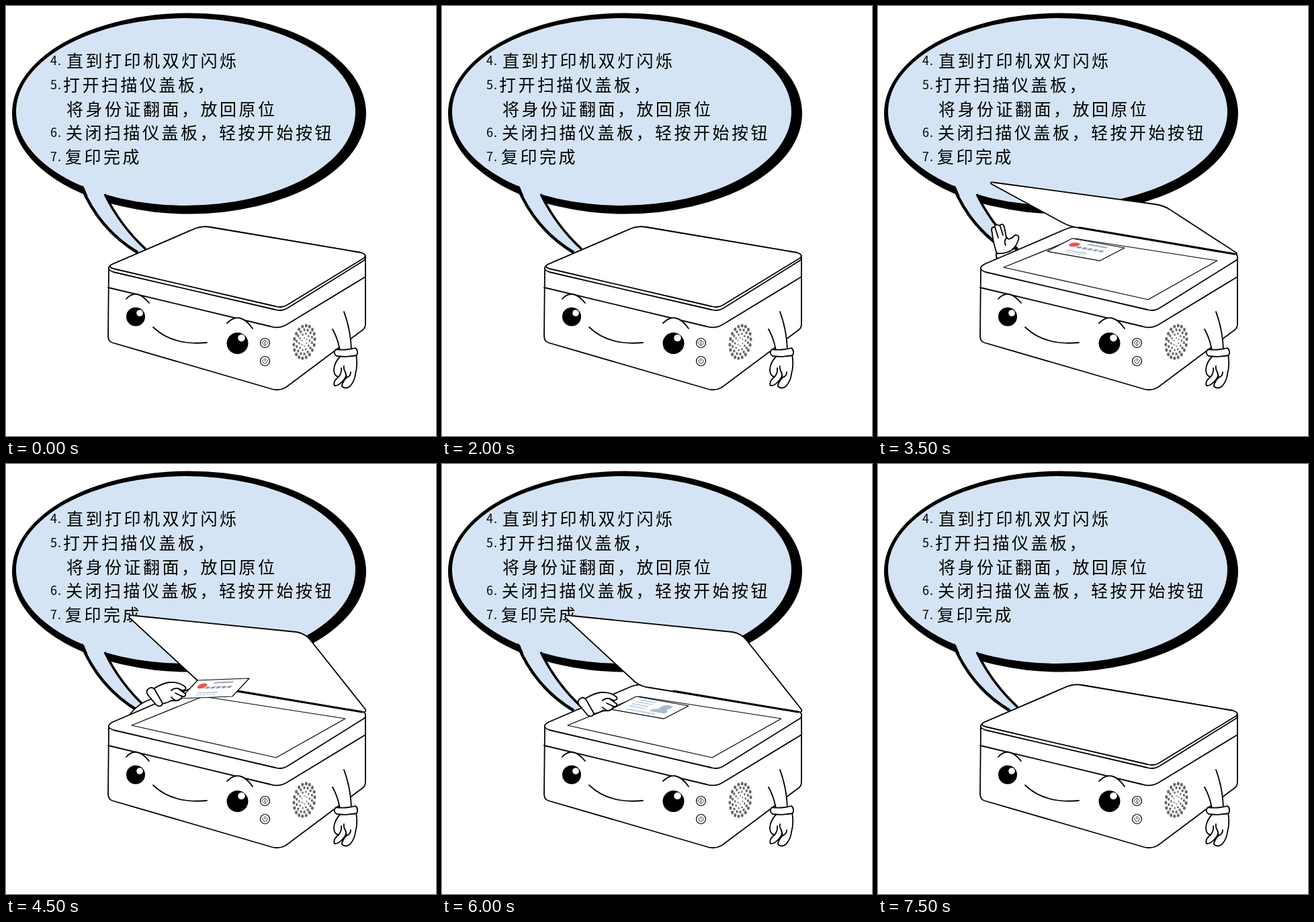
An HTML page for the animation above (8 s loop, 640 px wide and 640 px high).

```html
<!DOCTYPE html>
<html lang="zh-CN">
<head>
<meta charset="utf-8">
<title>复印步骤</title>
<style>
html, body { margin: 0; height: 100%; overflow: hidden; background: #fff; }
svg { display: block; width: 100vw; height: 100vh; }
text { font: 300 25px "Noto Sans CJK SC", "Noto Sans CJK", sans-serif; letter-spacing: 3.5px; }
.num { font-size: 18px; letter-spacing: 1px; }
.ink { fill: #fff; stroke: #000; stroke-width: 1.8; stroke-linejoin: round; stroke-linecap: round; }
.line { fill: none; }
.thin { stroke-width: 1.2; }
</style>
</head>
<body>
<svg viewBox="0 0 640 640">
  <ellipse cx="272.5" cy="160" rx="263.5" ry="149.5"/>
  <ellipse cx="267.5" cy="157.5" rx="252.5" ry="139.5" fill="#d5e4f5"/>
  <path d="M113 262Q138 331 197 367L208 363Q168 325 145 274Z" fill="#d5e4f5"/>
  <path d="M112 268Q138 332 196 367" fill="none" stroke="#000" stroke-width="4.5"/>
  <path d="M147 280Q170 327 208 362" fill="none" stroke="#000" stroke-width="3.5"/>
  <g id="words"></g>

  <g id="push" class="ink">
    <path d="M177 380L176 366Q171 350 170 338Q167 329 173 329Q176 323 181 327Q186 322 188 329L191 345Q195 350 204 341Q211 340 209 348Q205 359 200 362L207 374Z"/>
    <path class="line" d="M174 329L179 345M182 328L186 341M191 345Q187 351 190 356"/>
    <path d="M177 368Q190 370 203 361Q208 364 204 368Q190 378 178 376Q174 371 177 368Z"/>
  </g>
  <path id="arm" class="ink" d="M180 379Q194 357 216 350L231 359Q212 364 198 376"/>

  <g id="printer" class="ink">
    <path d="M153 391L152 491Q152 499 158 501L392 569Q405 574 416 568L531 482Q535 479 535 473L535 375L293 331Z"/>
    <path d="M159 384L282 331Q292 327 303 329L528 367Q538 370 534 378L420 449Q411 455 401 452L160 396Q146 391 159 384Z"/>
    <path class="line" d="M152 419L394 477Q406 481 418 474L535 403"/>
    <path id="glass" class="thin" d="M187 389L293 346L505 379L402 437Z"/>
    <path d="M179 436Q194 419 213 442"/>
    <path d="M329 472Q348 453 367 480"/>
    <path class="line" d="M219 478Q248 506 299 501"/>
    <g stroke="none">
      <circle cx="193" cy="462.500" r="14" fill="#000"/><circle cx="199" cy="457" r="4.800"/>
      <circle cx="344.500" cy="502" r="16" fill="#000"/><circle cx="350.500" cy="494" r="5.300"/>
    </g>
    <g class="thin">
      <circle class="lamp" cx="385.500" cy="501.500" r="7"/>
      <circle class="lamp" cx="385.500" cy="528.500" r="7"/>
      <path class="line" stroke-width=".8" d="M385.500 497l4.500 4.500l-4.500 4.500l-4.500 -4.500zM385.500 499v5M383 526a3.500 3.500 0 1 0 5 0M385.500 524.500v4"/>
    </g>
    <g id="speaker" fill="#666" stroke="none"></g>
    <path stroke="none" d="M503 455Q513 482 514 512L497 513Q494 495 486 481Z"/>
    <path class="line" d="M503 455Q513 482 514 512M486 481Q494 495 497 513"/>
    <path d="M499 520Q489 529 488 541Q488 551 495 552Q486 559 489 565Q495 566 503 556Q508 551 505 545L507 553Q500 560 500 566Q505 571 512 566Q519 558 520 548Q524 534 521 519Z"/>
    <path class="line" d="M495 552Q500 546 499 539M505 545Q502 540 503 536M507 553Q513 551 513 545"/>
    <path d="M491 511Q505 513 520 509Q525 513 522 520Q506 523 492 521Q486 517 491 511Z"/>
  </g>

  <g id="bedCard"></g>
  <g class="ink">
    <path id="lid"/>
    <path id="hinge" class="line" stroke-width="3"/>
  </g>
  <g id="heldCard"></g>
  <g id="hand" class="ink">
    <path d="M219 335Q233 326 243 325Q258 324 267 332Q269 336 263 337L256 334L267 342Q268 347 262 346Q260 354 246 352Q240 356 231 357Z"/>
    <path class="line" d="M263 346L252 341M256 334Q250 333 246 337M253 352Q248 350 246 347"/>
    <path d="M213 334Q206 338 213 346L224 359Q231 363 233 356L221 335Q217 331 213 334Z"/>
  </g>
</svg>
<script>
const $ = id => document.getElementById(id);

const lines = [
  ['4.', 90, '直到打印机双灯闪烁'],
  ['5.', 85, '打开扫描仪盖板，'],
  ['', 90, '将身份证翻面，放回原位'],
  ['6.', 89, '关闭扫描仪盖板，轻按开始按钮'],
  ['7.', 88, '复印完成']
];
$('words').innerHTML = lines.map(([n, x, s], i) => {
  const y = 91 + i * 35.8;
  return `<text class="num" x="66" y="${y - 3}">${n}</text><text x="${x}" y="${y}">${s}</text>`;
}).join('');

let dots = '';
for (let ring = 1; ring <= 4; ring++) {
  const count = ring * 4 + 2;
  for (let i = 0; i < count; i++) {
    const a = (i + ring / 2) / count * 2 * Math.PI;
    const x = 444 + ring * 3.9 * Math.cos(a);
    const y = 500 + ring * 6 * Math.sin(a) - ring * Math.cos(a);
    dots += `<ellipse cx="${x}" cy="${y}" rx="${.5 + ring * .38}" ry="${.6 + ring * .52}"/>`;
  }
}
$('speaker').innerHTML = dots;

// Cards are drawn on a 100 x 60 sheet and placed by a matrix
const rule = (x, y, w, h, fill) => `<rect x="${x}" y="${y}" width="${w}" height="${h}" fill="${fill}"/>`;
const front = '<circle cx="20" cy="20" r="8.500" fill="#f0524f"/>' +
  rule(38, 8, 37, 5, '#a3adba') +
  [0, 1, 2, 3, 4].map(i => rule(30 + i * 10.5, 23, 8, 7, '#8f9cab')).join('') +
  rule(23, 42, 39, 2.5, '#8fb0d0') + rule(23, 49, 39, 2, '#b4c6d8');
const back = [8, 17, 26, 35].map(y => rule(13, y, 32, 2.5, '#9dbbd8')).join('') +
  rule(20, 48, 55, 2.5, '#9dbbd8') +
  '<path d="M58 42Q57 31 65 29Q60 10 73 10Q86 11 79 28Q88 31 87 42Z" fill="#a9bccb"/>';
const places = {
  bed: '.78 .14 -.617 .32 289 346',
  held: '.77 -.03 -.42 .45 285 322',
  turn: '.93 -.25 .03 .07 266 343'
};
const card = (place, face) => `<g transform="matrix(${places[place]})">
  <path class="ink thin" vector-effect="non-scaling-stroke" d="M0 0H100V60H0Z"/>${face}</g>`;

const lids = [
  'M159 384L282 331Q292 327 303 329L528 367Q538 370 533 375L420 444Q411 450 401 447L160 391Q150 388 159 384Z',
  'M157 347L283 329Q292 327 303 329L530 367Q538 370 531 374L424 407Q412 413 400 411L162 357Q148 350 157 347Z',
  'M169 265Q165 261 175 263L412 295Q426 297 436 304L533 367Q536 370 530 369L299 330Q286 329 272 321Z',
  'M184 229Q180 224 194 226L432 250Q445 252 453 262L534 364Q538 370 530 369L310 333Q298 332 288 325Z'
];
const hinges = ['', '', 'M300 330L530 369', 'M345 338L530 369'];

const opening = [0, 0, 0, 0, 0, 0, 1, 2, 3, 3, 3, 3, 3, 2, 1, 0];
const show = (id, on) => $(id).style.display = on ? '' : 'none';
let shown = -1;

function draw(now) {
  const step = Math.floor(now / 500) % 16;
  if (step !== shown) {
    shown = step;
    const open = opening[step];
    const blink = step < 6 && step % 2 === 1;
    const held = step >= 9 && step <= 11;
    const face = step < 10 ? front : back;
    $('lid').setAttribute('d', lids[open]);
    $('hinge').setAttribute('d', hinges[open]);
    show('glass', open);
    show('push', open === 2);
    show('arm', open === 3);
    show('hand', open === 3);
    $('hand').setAttribute('transform', held ? '' : 'translate(-7 15)');
    $('arm').setAttribute('transform', held ? '' : 'translate(-4 14)');
    $('bedCard').innerHTML = open > 1 && !held ? card('bed', face) : '';
    $('heldCard').innerHTML = !held ? '' : step === 10 ? card('turn', '') : card('held', face);
    $('printer').setAttribute('transform', blink ? 'translate(.5 0)' : '');
    document.querySelectorAll('.lamp').forEach(l => l.style.fill = blink ? '#9cc8f0' : '');
  }
  requestAnimationFrame(draw);
}
requestAnimationFrame(draw);
</script>
</body>
</html>
```
